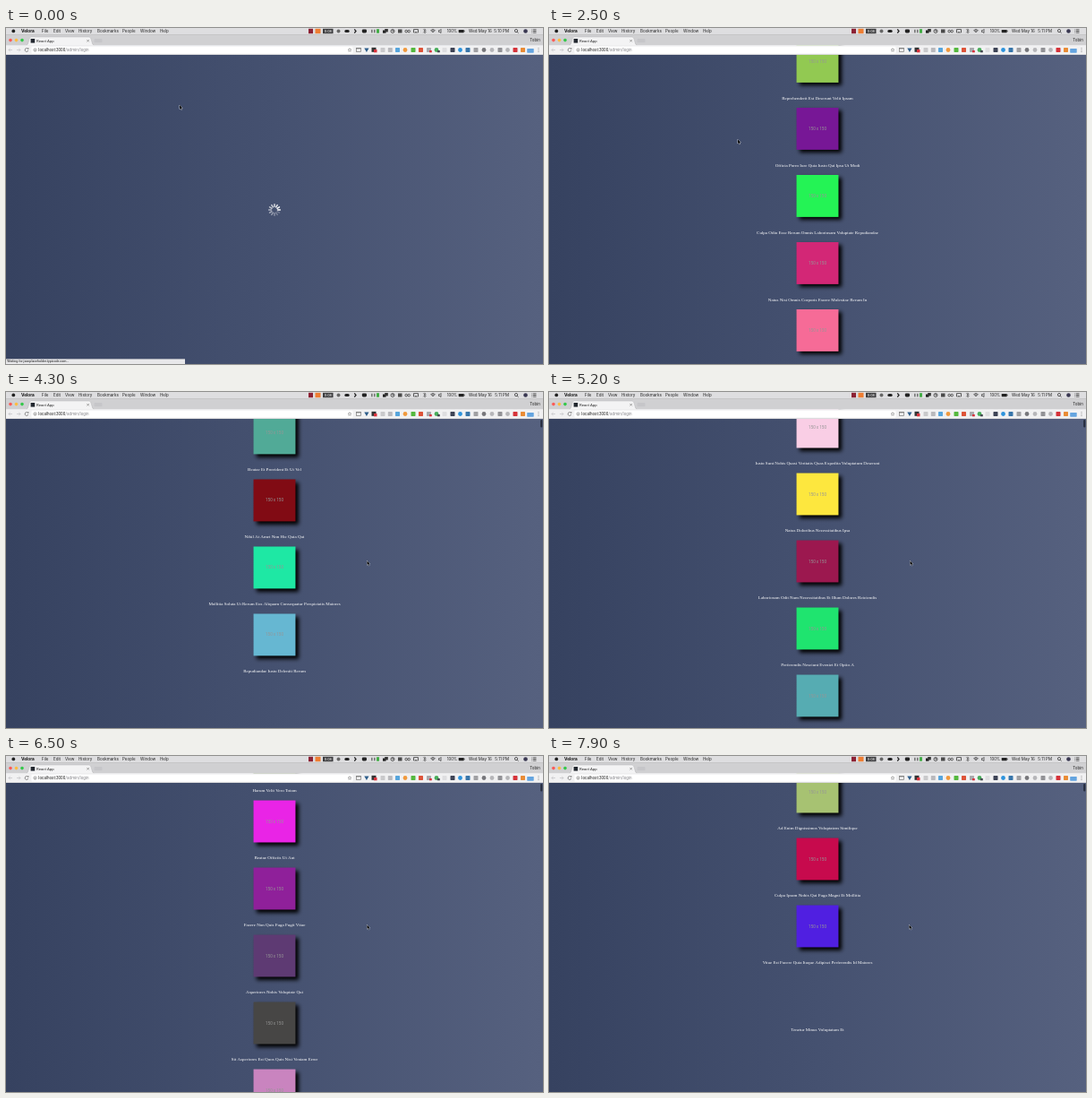
An HTML page with a canvas that plays this animation: 600x375 px, repeating every 8 s.

```html
<!DOCTYPE html>
<html lang="en">
<head>
<meta charset="utf-8">
<title>React App</title>
<style>
  html, body { margin: 0; width: 100%; height: 100%; overflow: hidden; background: #445070; }
  canvas { display: block; width: 600px; height: 375px; }
</style>
</head>
<body>
<canvas id="stage" width="600" height="375"></canvas>
<script>
const ctx = document.getElementById('stage').getContext('2d');
const LOOP = 8000;
const PITCH = 75;
const IMG = 46.9;
const DATA_AT = 900;
const SANS = 'Roboto, "Liberation Sans", sans-serif';
const MENU = 'Inter, Roboto, sans-serif';

const photos = `92c952 accusamus beatae ad facilis cum similique qui sunt
771796 reprehenderit est deserunt velit ipsam
24f355 officia porro iure quia iusto qui ipsa ut modi
d32776 culpa odio esse rerum omnis laboriosam voluptate repudiandae
f66b97 natus nisi omnis corporis facere molestiae rerum in
56a8c2 accusamus ea aliquid et amet sequi nemo
b0f7cc officia delectus consequatur vero aut veniam explicabo molestias
54176f aut porro officiis laborum odit ea laudantium corporis
51aa97 qui eius qui autem sed
810b14 beatae et provident et ut vel
1ee8a4 nihil at amet non hic quia qui
66b7d2 mollitia soluta ut rerum eos aliquam consequatur perspiciatis maiores
197d29 repudiandae iusto deleniti rerum
061a65 est necessitatibus architecto ut laborum
f9cee5 harum dicta similique quis dolore earum ex qui
fde73e iusto sunt nobis quasi veritatis quas expedita voluptatum deserunt
9c184f natus doloribus necessitatibus ipsa
1fe46f laboriosam odit nam necessitatibus et illum dolores reiciendis
56acb2 perferendis nesciunt eveniet et optio a
8985dc assumenda voluptatem laboriosam enim consequatur veniam placeat reiciendis error
5e12c6 ad et natus qui
45601a et ea illo et sit voluptas animi blanditiis porro
e924e6 harum velit vero totam
8f209a beatae officiis ut aut
5e3a73 facere non quis fuga fugit vitae
474645 asperiores nobis voluptate qui
c984bf sit asperiores est quos quis nisi veniam error
392537 non neque eligendi molestiae repudiandae illum voluptatem qui aut
602b9e aut ipsam quos ab placeat omnis
372c93 odio enim voluptatem quidem aut nihil illum
a7c272 voluptate voluptates sequi
c70a4d ad enim dignissimos voluptatem similique
501fe1 culpa ipsam nobis qui fuga magni et mollitia
35185e vitae est facere quia itaque adipisci perferendis id maiores
c96cad tenetur minus voluptatum et`.split('\n').map(line => ({
  color: '#' + line.slice(0, 6),
  title: line.slice(7).replace(/\b[a-z]/g, c => c.toUpperCase())
}));

// [time, y of the first title]
const scrollKeys = [[0, 3], [2600, 3], [3600, -227], [4300, -588], [5200, -1045], [6500, -1611], [7900, -2244], [8000, -2289]];
// [time, x, y]
const cursorKeys = [[0, 194, 86], [1200, 194, 86], [2400, 211, 124.5], [2600, 211, 124.5], [3200, 406, 187.5],
  [3700, 406, 187.5], [4200, 403.5, 188.5], [6600, 403.5, 188.5], [7700, 402.5, 188.5], [8000, 402.5, 188.5]];

// Monotone cubic through the keys
function curve(keys, t) {
  const slope = i => (keys[i + 1][1] - keys[i][1]) / (keys[i + 1][0] - keys[i][0]);
  const tangent = i => {
    if (i === 0 || i === keys.length - 1) return slope(Math.max(0, i - 1));
    const a = slope(i - 1), b = slope(i);
    return a * b <= 0 ? 0 : 2 * a * b / (a + b);
  };
  let i = 0;
  while (i < keys.length - 2 && t >= keys[i + 1][0]) i++;
  const [t0, v0] = keys[i], [t1, v1] = keys[i + 1];
  const h = t1 - t0, u = (t - t0) / h, w = 1 - u;
  return v0 * w * w * (1 + 2 * u) + tangent(i) * h * u * w * w
    + v1 * u * u * (3 - 2 * u) - tangent(i + 1) * h * u * u * w;
}

function rect(x, y, w, h, fill) {
  ctx.fillStyle = fill;
  ctx.fillRect(x, y, w, h);
}

function round(x, y, w, h, r, fill) {
  ctx.fillStyle = fill;
  ctx.beginPath();
  ctx.roundRect(x, y, w, h, r);
  ctx.fill();
}

function dot(x, y, r, fill) {
  ctx.fillStyle = fill;
  ctx.beginPath();
  ctx.arc(x, y, r, 0, 7);
  ctx.fill();
}

function ring(x, y, r, color) {
  ctx.strokeStyle = color;
  ctx.lineWidth = 0.7;
  ctx.beginPath();
  ctx.arc(x, y, r, 0, 7);
  ctx.stroke();
}

function path(points, color, width = 0.7) {
  ctx.strokeStyle = color;
  ctx.lineWidth = width;
  ctx.beginPath();
  points.forEach(([x, y]) => ctx.lineTo(x, y));
  ctx.stroke();
}

function text(str, x, y, font, color = '#222', align = 'left') {
  ctx.font = font;
  ctx.fillStyle = color;
  ctx.textAlign = align;
  ctx.textBaseline = 'alphabetic';
  ctx.fillText(str, x, y);
}

function drawPage() {
  const g = ctx.createLinearGradient(0, 0, 600, 0);
  g.addColorStop(0, '#364260');
  g.addColorStop(0.5, '#455170');
  g.addColorStop(1, '#56617f');
  rect(0, 30, 600, 345, g);
}

function drawSpinner(t) {
  const step = Math.floor(t / 1000 * 12);
  ctx.lineCap = 'round';
  for (let i = 0; i < 12; i++) {
    const age = (step + 3 - i + 24) % 12;
    const a = i * Math.PI / 6 - Math.PI / 2;
    const c = Math.cos(a), s = Math.sin(a);
    path([[300 + c * 3.5, 203 + s * 3.5], [300 + c * 6.3, 203 + s * 6.3]],
      `rgba(255,255,255,${1 - age * 0.07})`, 1.5);
  }
  ctx.lineCap = 'butt';
}

function loadTime(i) {
  if (i >= 33) return LOOP;
  return i === 12 || i === 13 ? 4500 : 1100;
}

function drawList(t) {
  const top = curve(scrollKeys, t);
  photos.forEach(({ color, title }, i) => {
    const y = top + i * PITCH;
    if (y < -40 || y > 380) return;
    text(title, 300, y + 1.6, '5px "Liberation Serif", serif', '#fff', 'center');
    if (t < loadTime(i)) return;
    ctx.save();
    ctx.shadowColor = '#000';
    ctx.shadowOffsetX = ctx.shadowOffsetY = 3.2;
    ctx.shadowBlur = 4.5;
    rect(300 - IMG / 2, y + 11, IMG, IMG, color);
    ctx.restore();
    text('150 x 150', 300, y + 36, `4.6px ${SANS}`, '#969696', 'center');
  });
}

function drawMenuBar(t) {
  rect(0, 0, 600, 7, '#dedee0');
  dot(8.3, 3.4, 1.9, '#222');
  text('Velora', 17, 5.1, `bold 4.7px ${MENU}`, '#111');
  [['File', 40], ['Edit', 53], ['View', 66], ['History', 81], ['Bookmarks', 102],
    ['People', 130], ['Window', 150], ['Help', 172]]
    .forEach(([s, x]) => text(s, x, 5.1, `4.5px ${MENU}`));

  rect(338, 0.8, 5, 5.4, '#8c2134');
  rect(345.5, 0.8, 6, 5.4, '#ee7d32');
  rect(354, 0.8, 11.5, 5.4, '#3c3c3e');
  text('0:08', 359.8, 5, `4.2px ${SANS}`, '#fff', 'center');
  dot(371.5, 3.5, 2, '#666');
  round(378.3, 2, 5.4, 3, 1.5, '#222');
  path([[389.3, 1.3], [391, 3.5], [389.3, 5.7]], '#222', 1.3);
  round(397.8, 1.4, 5.2, 4, 1.4, '#222');
  rect(408, 1.8, 1.6, 3.5, '#777');
  rect(411, 1.8, 1.6, 3.5, '#777');
  rect(414, 1.2, 3, 4.5, '#42ad45');
  rect(421, 2.5, 3.5, 3.2, '#222');
  rect(423.2, 1, 3.6, 3.4, '#333');
  ring(432, 3.5, 2, '#222');
  path([[432, 2], [432, 3.6], [433.2, 3.6]], '#222');
  rect(438, 1.5, 4.5, 4, '#4a4a4a');
  ring(447.2, 3.6, 1.3, '#222');
  ring(450.2, 3.6, 1.3, '#222');
  path([[456.4, 5], [455.5, 5], [455.5, 1.6], [460.5, 1.6], [460.5, 5], [459.6, 5]], '#222');
  path([[457.2, 5.5], [458, 4.3], [458.8, 5.5]], '#222', 1);
  path([[466.2, 1.3], [469.2, 4.5], [467.8, 6], [467.8, 1], [469.2, 2.3], [466.2, 5.3]], '#444', 0.6);
  ctx.lineWidth = 0.7;
  ctx.strokeStyle = '#222';
  for (const r of [1.2, 2.5, 3.8]) {
    ctx.beginPath();
    ctx.arc(477, 5.5, r, -2.35, -0.79);
    ctx.stroke();
  }
  path([[483.5, 2.6], [484.8, 2.6], [486, 1.4], [486, 5.6], [484.8, 4.5], [483.5, 4.5], [483.5, 2.6]], '#333');
  text('100%', 492.7, 5.1, `4.3px ${MENU}`);
  round(505.7, 1.9, 6, 3.3, 0.6, '#222');
  rect(511.9, 2.8, 0.6, 1.4, '#222');
  text('Wed May 16', 517, 5.1, `4.5px ${MENU}`);
  text(t < DATA_AT ? '5:10 PM' : '5:11 PM', 562, 5.1, `4.5px ${MENU}`, '#222', 'right');
  ring(570, 3.1, 1.6, '#222');
  path([[571.2, 4.3], [572.6, 5.7]], '#222');
  dot(580.5, 3.5, 2.3, '#3a3852');
  for (const y of [1.8, 3.5, 5.2]) {
    path([[587.5, y], [588.3, y]], '#222');
    path([[589, y], [592.5, y]], '#222');
  }
}

function drawTabs() {
  rect(0, 7, 600, 12.5, '#d0d0d2');
  rect(0, 7, 600, 0.4, '#b5b5b7');
  dot(5, 13.6, 1.8, '#fc5b57');
  dot(11.5, 13.6, 1.8, '#fdbc40');
  dot(18, 13.6, 1.8, '#34c84a');
  ctx.fillStyle = '#f3f3f4';
  ctx.strokeStyle = '#a9a9ab';
  ctx.lineWidth = 0.4;
  ctx.beginPath();
  ctx.moveTo(22.5, 19.5);
  ctx.quadraticCurveTo(24.5, 19, 25.3, 15);
  ctx.quadraticCurveTo(26, 10, 28, 10);
  ctx.lineTo(93, 10);
  ctx.quadraticCurveTo(95, 10, 95.8, 15);
  ctx.quadraticCurveTo(96.6, 19, 98.5, 19.5);
  ctx.fill();
  ctx.stroke();
  rect(27.6, 12, 4.6, 4.6, '#22272f');
  text('React App', 34, 16, `4.3px ${SANS}`);
  path([[90.4, 13.1], [92.8, 15.5]], '#666', 0.6);
  path([[92.8, 13.1], [90.4, 15.5]], '#666', 0.6);
  round(98.5, 12, 9, 4.2, 1, '#c6c6c9');
  text('Tobin', 597, 15.4, `4.5px ${MENU}`, '#222', 'right');
}

function drawToolbar() {
  rect(0, 19.3, 600, 10.7, '#f1f1f2');
  rect(0, 29.6, 600, 0.4, '#b9b9bb');
  for (const [x, d] of [[5, -1], [14, 1]]) {
    path([[x - 2 * d, 24.5], [x + 2 * d, 24.5]], '#c2c2c4');
    path([[x + 0.3 * d, 22.7], [x + 2 * d, 24.5], [x + 0.3 * d, 26.3]], '#c2c2c4');
  }
  ctx.strokeStyle = '#777';
  ctx.lineWidth = 0.8;
  ctx.beginPath();
  ctx.arc(23, 24.5, 1.9, 0.3, 5.3);
  ctx.stroke();
  rect(24, 22.3, 1.4, 1.4, '#777');
  round(28.5, 20.7, 359, 7.9, 1, '#fff');
  ring(32.5, 24.5, 1.6, '#777');
  path([[32.5, 24], [32.5, 25.5]], '#777', 0.6);
  const font = `4.55px ${SANS}`;
  text('localhost:3000', 36.3, 26.2, font);
  text('/admin/login', 36.3 + ctx.measureText('localhost:3000').width, 26.2, font, '#85858a');

  const star = [];
  for (let i = 0; i <= 10; i++) {
    const r = i % 2 ? 0.9 : 2.1, a = i * Math.PI / 5 - Math.PI / 2;
    star.push([384 + r * Math.cos(a), 24.6 + r * Math.sin(a)]);
  }
  path(star, '#777', 0.5);

  ctx.strokeStyle = '#777';
  ctx.lineWidth = 0.7;
  ctx.strokeRect(391.5, 22.6, 5, 3.8);
  rect(391.5, 22.3, 5, 1, '#777');
  ctx.fillStyle = '#2d5d8a';
  ctx.beginPath();
  ctx.moveTo(400.3, 22.6);
  ctx.lineTo(405.5, 22.6);
  ctx.lineTo(402.9, 27);
  ctx.fill();
  rect(408.5, 21.8, 5, 5, '#333');
  rect(411, 24, 3.5, 3.3, '#d8323c');
  const icons = [[421, '#c9c9cb', 0], [429.3, '#b9b9bd', 0], [437.5, '#57a5dc', 0], [446, '#f0993d', 1],
    [455, '#55b83e', 0], [463.5, '#dd5338', 0], [472.5, '#a9a9ac', 0], [481, '#49ad5b', 1], [490, '#dedee0', 0],
    [499, '#3d4355', 0], [507.5, '#2d93dc', 1], [516, '#3976aa', 0], [525, '#a0a0a3', 0], [534, '#77777b', 1],
    [543, '#b6b6b9', 1], [552, '#929296', 0], [560.5, '#b5b5b8', 1], [569, '#d5333a', 0], [577.5, '#e98b35', 0]];
  for (const [x, color, circle] of icons) {
    if (circle) dot(x, 24.5, 2.4, color);
    else round(x - 2.5, 22.1, 5, 4.8, 0.6, color);
  }
  rect(473, 25, 2.8, 2.3, '#d8323c');
  rect(482, 25, 2.8, 2.3, '#43494f');
  round(582.2, 23, 7.5, 4.7, 0.6, '#64a4df');
  for (const y of [22.6, 24.5, 26.4]) dot(595, y, 0.6, '#999');
}

function drawStatus() {
  rect(0, 369.5, 200, 5.5, '#e8e8ea');
  rect(0, 369.3, 200, 0.4, '#b4b4b8');
  text('Waiting for jsonplaceholder.typicode.com...', 1.3, 373.4, `3.6px ${SANS}`, '#111');
}

function drawCursor(t) {
  let i = 0;
  while (i < cursorKeys.length - 2 && t >= cursorKeys[i + 1][0]) i++;
  const [t0, x0, y0] = cursorKeys[i], [t1, x1, y1] = cursorKeys[i + 1];
  const u = (t - t0) / (t1 - t0), e = u * u * (3 - 2 * u);
  ctx.save();
  ctx.translate(x0 + (x1 - x0) * e, y0 + (y1 - y0) * e);
  ctx.beginPath();
  [[0, 0], [0, 4.5], [1, 3.6], [1.8, 5.3], [2.5, 5], [1.8, 3.3], [3.2, 3.2]]
    .forEach(([x, y]) => ctx.lineTo(x, y));
  ctx.closePath();
  ctx.strokeStyle = '#d5d9e2';
  ctx.lineWidth = 0.8;
  ctx.stroke();
  ctx.fillStyle = '#000';
  ctx.fill();
  ctx.restore();
}

function draw(t) {
  drawPage();
  if (t < DATA_AT) drawSpinner(t);
  else drawList(t);
  if (t >= 2650) round(597.2, 31, 2.1, 8.5, 1, '#252c3d');
  drawMenuBar(t);
  drawTabs();
  drawToolbar();
  if (t < DATA_AT) drawStatus();
  drawCursor(t);
}

function tick() {
  draw(performance.now() % LOOP);
  requestAnimationFrame(tick);
}
tick();
</script>
</body>
</html>
```
